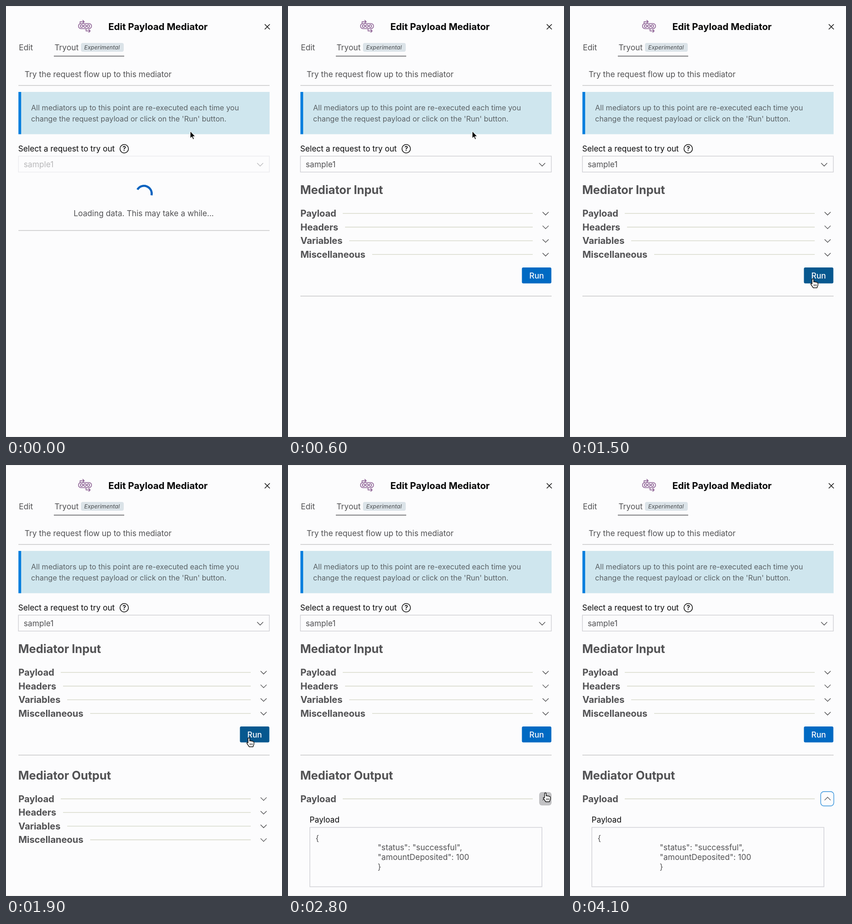
Animation, 600 px wide and 933 px high, one loop 4.2 s. Source, as an HTML page:

```html
<!DOCTYPE html>
<html lang="en">
<head>
<meta charset="utf-8">
<title>Edit Payload Mediator</title>
<style>
  html, body { margin: 0; width: 100%; height: 100%; overflow: hidden; background: #fcfcfd; }
  svg { display: block; width: 100vw; height: 100vh; }
  text { font: 17.2px Inter, "Open Sans", sans-serif; fill: #525254; white-space: pre; }
  .dark { fill: #0a0a0b; }
  .title { font-size: 20.3px; font-weight: 700; fill: #050505; }
  .h2 { font-size: 25.4px; font-weight: 700; letter-spacing: -.1px; }
  .h3 { font-size: 20.1px; font-weight: 700; letter-spacing: -.1px; }
  .note { font-size: 16.05px; fill: #5b6266; }
  .badge { font-size: 12.3px; font-style: italic; letter-spacing: .1px; fill: #45494c; }
  .code { font-size: 17.3px; }
  .line { fill: none; stroke: #48484a; stroke-width: 1.3; }
  .rule { stroke: #c9c9ca; stroke-width: 1.4; }
  .row { stroke: #d9dbcd; stroke-width: 1.6; }
  .field { fill: none; stroke: #cfcfd4; stroke-width: 1.4; }
  .off text { fill: #b8b8ba; }
  .off .field { stroke: #ebebee; }
  .off .line { stroke: #b9b9bb; }
</style>
</head>
<body>
<svg id="stage" viewBox="0 0 600 933" preserveAspectRatio="none"></svg>
<script>
const text = (x, y, s, cls = '') => `<text x="${x}" y="${y}" class="${cls}">${s}</text>`;
const rule = (y, x1 = 27, x2 = 573, cls = 'rule') => `<path class="${cls}" d="M${x1} ${y}H${x2}"/>`;
const chevron = (x, y, dir = 1) =>
  `<path class="line" d="M${x - 6.5} ${y - 3 * dir}l6.5 ${6.5 * dir} 6.5 ${-6.5 * dir}"/>`;
const group = (id, body) => `<g id="${id}">${body}</g>`;

const sections = [['Payload', 119], ['Headers', 124], ['Variables', 133], ['Miscellaneous', 183]];
const row = ([name, x], y) => text(27, y + 7, name, 'h3') + rule(y, x, 532, 'row');
const rows = (list, y) => list.map((s, i) => row(s, y + i * 29.6) + chevron(560, y + i * 29.6)).join('');

const header = `
  <path d="M0 .5H600M0 932.5H600" stroke="#e9e9e8"/>
  <g fill="none" stroke="#87598f" stroke-width="1.5">
    <rect x="157.5" y="38" width="28.5" height="11" rx="5.5"/>
    <circle cx="164.3" cy="43.5" r="2.7"/><circle cx="171.7" cy="43.5" r="2.7"/><circle cx="179.1" cy="43.5" r="2.7"/>
    <path d="M161 38V34H169.5M166.5 30.5l3.5 3.5-3.5 3.5M174 49V54H182.5M179.5 50.5l3.5 3.5-3.5 3.5"/>
  </g>
  ${text(222.5, 52, 'Edit Payload Mediator', 'title')}
  <path d="M562.5 39.5l11 11m0-11l-11 11" stroke="#111" stroke-width="1.5"/>
  ${text(28, 96, 'Edit')}${text(105.5, 96, 'Tryout')}
  <rect x="163" y="80" width="93" height="19" rx="4" fill="#dbe3e8"/>
  ${text(170, 94, 'Experimental', 'badge')}
  <path d="M104 108.5H257" stroke="#555557" stroke-width="1.5"/>
  ${text(40.5, 154, 'Try the request flow up to this mediator')}${rule(172)}
  <rect x="27" y="186" width="546" height="91.5" fill="#cfe6ee"/>
  <rect x="27" y="186" width="6" height="91.5" fill="#0a80de"/>
  ${text(54.5, 226, 'All mediators up to this point are re-executed each time you', 'note')}
  ${text(54.5, 250, "change the request payload or click on the 'Run' button.", 'note')}
  ${text(26.5, 314.5, 'Select a request to try out', 'dark')}
  <circle cx="257" cy="309" r="9.2" fill="none" stroke="#111" stroke-width="1.6"/>
  <text x="257" y="314" class="dark" text-anchor="middle" style="font-size:14px;font-weight:600">?</text>`;

const select = `<rect class="field" x="27" y="325" width="545.5" height="34.5"/>
  ${text(38.5, 349, 'sample1')}${chevron(552.5, 343)}`;

const loading = `<path id="ring" fill="none" stroke="#0762bf" stroke-width="4.6"/>
  ${text(147, 455, 'Loading data. This may take a while...')}${rule(486)}`;

const input = `${text(26.5, 407, 'Mediator Input', 'h2')}${rows(sections, 449)}
  <rect id="run" x="508.5" y="566" width="64" height="34.5" rx="3"/>
  <text x="540.5" y="590" text-anchor="middle" style="font-size:17.3px;font-weight:500;fill:#fbfbfc">Run</text>
  ${rule(628)}`;

const output = `${text(26.5, 680.5, 'Mediator Output', 'h2')}
  <rect id="hover" x="546" y="708" width="27" height="29" rx="6" fill="#c2c2c4"/>
  <rect id="focus" x="545" y="707" width="28.5" height="31" rx="7" fill="none" stroke="#3794dc" stroke-width="1.4"/>
  ${row(sections[0], 722.6)}`;

const closed = chevron(560, 722.6) + rows(sections.slice(1), 752.2);

const open = `${chevron(560, 722.6, -1)}${text(47, 774, 'Payload', 'dark')}
  <rect class="field" x="47.5" y="784.5" width="504.5" height="128.5"/>
  ${text(60, 813.5, '{', 'code')}${text(195, 834, '"status": "successful",', 'code')}
  ${text(195, 855, '"amountDeposited": 100', 'code')}${text(195, 876, '}', 'code')}`;

const arrow = `<path d="M0 0V15.5L3.6 12.2 6 17.8 8.4 16.8 6 11.3H10.8Z" fill="#080808" stroke="#fff" stroke-width="1"/>`;
const hand = `<path d="M-1.8 2A1.8 1.8 0 0 1 1.8 2V7Q3.6 5.4 5.2 7.4Q7 6 8.3 8.2Q11 7.4 11 10V13.5L9 19.5H.8L-4.4 12Q-5 8.8-1.8 11Z"
  fill="#fff" stroke="#111" stroke-width="1.4" stroke-linejoin="round"/>
  <path d="M2.4 12V16M4.9 12V16M7.4 12V16" stroke="#111"/>`;

document.getElementById('stage').innerHTML = header + group('select', select) + group('loading', loading)
  + group('input', input) + group('output', output + group('closed', closed) + group('open', open))
  + group('cursor', group('arrow', arrow) + group('hand', hand));

const el = id => document.getElementById(id);
const show = (id, on) => el(id).style.display = on ? '' : 'none';

// Pointer path: time, x, y
const path = [
  [0, 400.5, 271], [1000, 400.5, 271], [1500, 528, 590.5], [2000, 528, 590.5],
  [2400, 559.5, 709.5], [2900, 559.5, 709.5], [3100, 558.5, 737.5], [3900, 558.5, 737.5], [4000, 565, 836]
];

function pointer(t) {
  const i = path.findIndex(k => k[0] > t);
  if (i < 0) return path[path.length - 1].slice(1);
  const [a, b] = [path[i - 1], path[i]];
  const u = (t - a[0]) / (b[0] - a[0]), e = u * u * (3 - 2 * u);
  return [a[1] + (b[1] - a[1]) * e, a[2] + (b[2] - a[2]) * e];
}

function ringArc(t) {
  const start = 211 + t * .478, size = 162 - t * .144, r = 16.7;
  const at = deg => {
    const a = deg * Math.PI / 180;
    return `${300 + r * Math.cos(a)} ${406 + r * Math.sin(a)}`;
  };
  return `M${at(start)}A${r} ${r} 0 0 1 ${at(start + size)}`;
}

function draw(t) {
  const busy = t < 600, done = t >= 1900, expanded = t >= 2800;
  const [x, y] = pointer(t);
  const onRun = !busy && x > 508 && x < 573 && y > 566 && y < 601;
  const onToggle = done && x > 546 && x < 573 && y > 708 && y < 738;

  el('select').setAttribute('class', busy ? 'off' : '');
  show('loading', busy);
  if (busy) el('ring').setAttribute('d', ringArc(t));
  show('input', !busy);
  el('run').setAttribute('fill', onRun ? '#07588f' : '#006ac3');
  show('output', done);
  show('closed', !expanded);
  show('open', expanded);
  show('hover', onToggle);
  show('focus', t >= 4000);
  show('cursor', t < 4100);
  show('arrow', !onRun && !onToggle);
  show('hand', onRun || onToggle);
  el('cursor').setAttribute('transform', `translate(${x} ${y})`);
}

const STEP = 100, LOOP = 4200;
const begin = performance.now();
function tick() {
  const t = (performance.now() - begin) % LOOP;
  draw(Math.floor(t / STEP) * STEP);
  requestAnimationFrame(tick);
}
tick();
</script>
</body>
</html>
```
